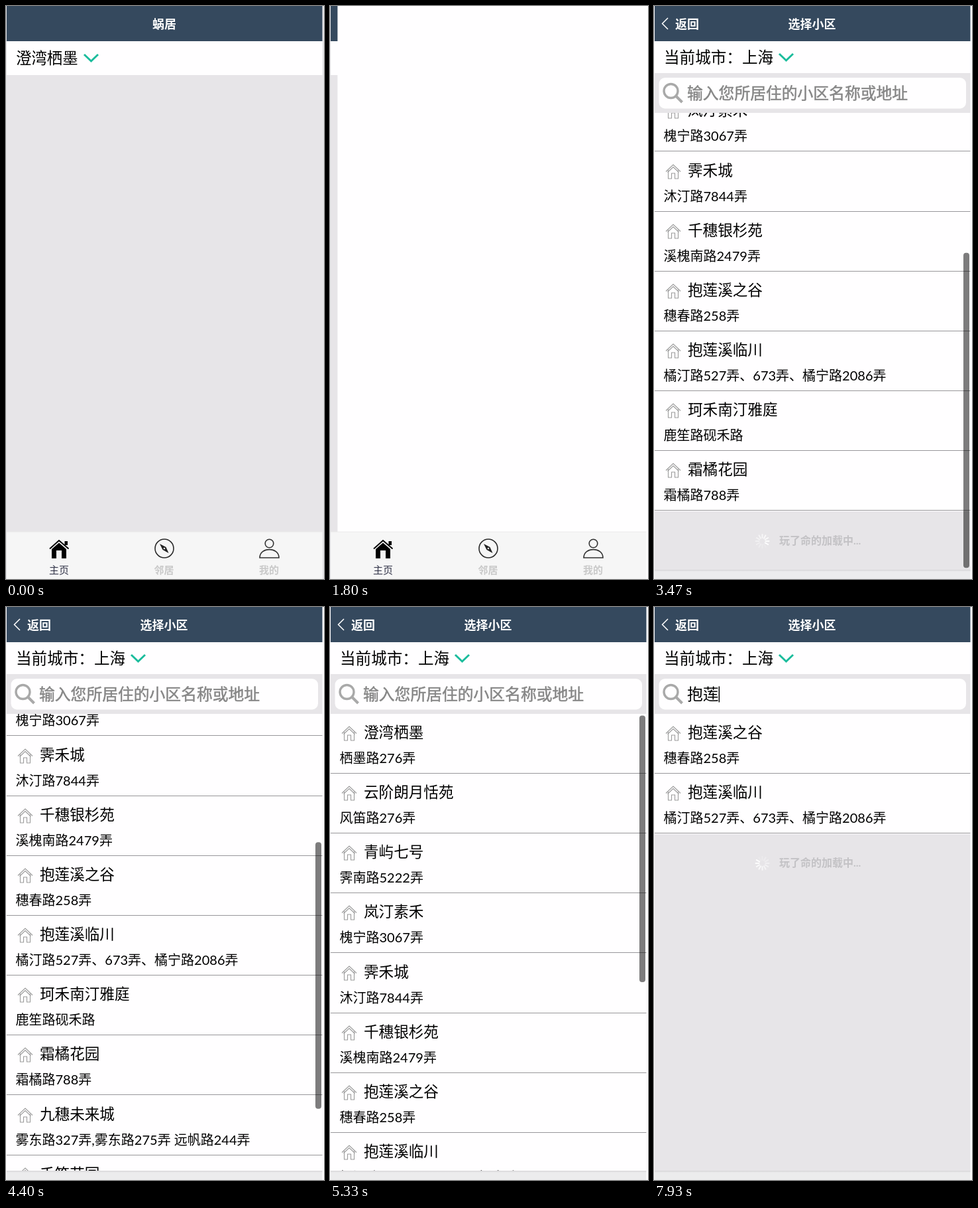
These frames come from a looping animation (480x863 px, 8000 ms). An HTML page:

```html
<!DOCTYPE html>
<html lang="zh-CN">
<head>
<meta charset="utf-8">
<title>选择小区</title>
<style>
  html, body { margin: 0; width: 100%; height: 100%; overflow: hidden; background: #fff; }
  svg { display: block; width: 480px; height: 863px; }
  text { font-family: Lato, "Noto Sans CJK SC", "Noto Sans CJK", sans-serif; white-space: pre; }
  .line { fill: none; stroke-linecap: butt; }
</style>
</head>
<body>
<svg id="stage" viewBox="0 0 480 863" xmlns="http://www.w3.org/2000/svg"></svg>
<script>
const LOOP = 8000;
const ROW = 90.15, TOP = 161, VIEW = 688.5;
const NAVY = '#35495e', GREY = '#e7e5e8', GREEN = '#1abc9c';

const places = [
  ['澄湾栖墨', '栖墨路276弄'],
  ['云阶朗月恬苑', '风笛路276弄'],
  ['青屿七号', '霁南路5222弄'],
  ['岚汀素禾', '槐宁路3067弄'],
  ['霁禾城', '沐汀路7844弄'],
  ['千穗银杉苑', '溪槐南路2479弄'],
  ['抱莲溪之谷', '穗春路258弄'],
  ['抱莲溪临川', '橘汀路527弄、673弄、橘宁路2086弄'],
  ['珂禾南汀雅庭', '鹿笙路砚禾路'],
  ['霜橘花园', '霜橘路788弄'],
  ['九穗未来城', '雾东路327弄,雾东路275弄 远帆路244弄'],
  ['禾笙花园', '砚禾路615弄']
];

// [time, scroll offset]
const scrollSteps = [
  [2870, 0], [3000, 26], [3330, 302], [4230, 302],
  [4400, 326], [4670, 483], [4730, 483], [5070, 0]
];

// [time, field text, candidates]
const typing = [
  [6270, 'b', '不吧被把北'],
  [6400, 'ba', '把吧八爸罢'],
  [6530, 'bao', '包报抱保宝'],
  [6670, "bao'l", ['抱莲', '暴力', '保留', '暴露', '包里']],
  [7070, '抱莲', null]
];

// Text placed by the vertical centre of its glyphs.
const text = (x, mid, size, str, fill = '#000', more = '') =>
  `<text x="${x}" y="${mid + size * 0.38}" font-size="${size}" fill="${fill}" ${more}>${str}</text>`;
const rect = (x, y, w, h, fill, more = '') =>
  `<rect x="${x}" y="${y}" width="${w}" height="${h}" fill="${fill}" ${more}/>`;
const line = (d, stroke, width, more = '') =>
  `<path class="line" d="${d}" stroke="${stroke}" stroke-width="${width}" ${more}/>`;
const bold = 'font-weight="700"';
const chevron = (x, y) => line(`M${x} ${y}l10.5 10 10.5 -10`, GREEN, 3);

const houseIcon = line(
  'M18 29.5L29 19 40 29.5M21.5 27.5V40H26.5V32H31.5V40H36.5V27.5M20.5 30.5L29 22.5 37.5 30.5', '#9b9b9b', 1.1);

const row = ([name, road], i) => `<g transform="translate(0 ${Math.round(i * ROW)})">
  ${rect(1, 0, 476.5, 91, '#fffeff')}${houseIcon}
  ${text(51, 27.5, 22.6, name)}${text(14.5, 66, 20, road)}
  ${rect(1, 89, 476.5, 1, '#98979a')}</g>`;

const petals = Array.from({ length: 12 }, (_, i) =>
  `<path d="M0 -5V-10" stroke="#fff" stroke-width="2" stroke-linecap="round" opacity="${0.15 + i * 0.075}" transform="rotate(${i * 30})"/>`).join('');
const loader = `<g id="loader"><g transform="translate(163.5 47)"><g id="spin">${petals}</g></g>
  ${text(189, 46, 16, '玩了命的加载中...', '#c3c2c5', bold)}</g>`;

const home = `
  ${rect(1, 0, 476.5, 53, NAVY)}
  ${text(239, 27, 18, '蜗居', '#fff', bold + ' text-anchor="middle"')}
  ${rect(1, 53, 476.5, 51, '#fffeff')}
  ${text(15, 78, 23.4, '澄湾栖墨')}${chevron(118, 73)}
  ${rect(1, 104, 476.5, 688, GREY)}`;

const tabs = `
  ${rect(1, 792, 476.5, 71, '#f6f6f6')}${rect(1, 791.5, 476.5, 1, '#ebebeb')}
  <path d="M69 818L80 808.5 91 818V832H84V820H76V832H69Z"/>
  ${line('M66 817.5L80 805 94.5 817.5', '#000', 2)}
  ${rect(88.5, 806, 4.5, 6, '#000')}
  <circle class="line" cx="239" cy="817" r="14" stroke="#2b2b2b" stroke-width="1.6"/>
  <path d="M232 810L241.5 815 245.5 824 236.5 819Z" fill="#222"/>
  <circle cx="239" cy="817" r="1.3" fill="#f6f6f6"/>
  <circle class="line" cx="397.5" cy="809.5" r="6.3" stroke="#333" stroke-width="1.6"/>
  ${line('M383 831C383 814.5 412 814.5 412 831Z', '#333', 1.6)}
  ${text(65, 849.5, 15, '主页', '#34364a', 'font-weight="500"')}
  ${text(223.5, 849.5, 15, '邻居', '#c9c9c9', bold)}
  ${text(382, 849.5, 15, '我的', '#c9c9c9', bold)}`;

const picker = `
  ${rect(1, 0, 476.5, 863, '#ececed')}
  ${rect(1, TOP, 476.5, VIEW, GREY)}
  <g clip-path="url(#view)"><g id="list">
    <g id="rows">${places.map(row).join('')}</g>
    <g id="hits">${places.slice(6, 8).map(row).join('')}</g>
    ${loader}</g>
  </g>
  ${rect(1, 849, 476.5, 3, 'url(#edge)')}
  <rect id="thumb" x="467" width="9" rx="4" fill="#000" fill-opacity=".51"/>
  ${rect(1, 0, 476.5, 53, NAVY)}
  ${line('M21 18L12.5 26.5 21 35', '#fff', 1.5)}
  ${text(32, 27, 18, '返回', '#fff', bold)}
  ${text(202.5, 27, 18, '选择小区', '#fff', bold)}
  ${rect(1, 53, 476.5, 48, '#fffeff')}
  ${text(15, 77, 23.6, '当前城市：上海')}${chevron(189, 72)}
  ${rect(1, 101, 476.5, 60, GREY)}
  ${rect(7.5, 108, 463.5, 46.5, '#fffeff', 'rx="9"')}
  <circle class="line" cx="25.5" cy="128" r="10.5" stroke="#a9a9a9" stroke-width="3.4"/>
  ${line('M33 135.5L42.5 145', '#a9a9a9', 4)}
  <g id="hint">${text(50, 131, 23.8, '输入您所居住的小区名称或地址', '#868686', 'stroke="#868686" stroke-width=".5"')}</g>
  <text id="field" x="50" y="139.5"></text>
  <rect id="under" x="50" y="141.5" height="1.6"/>
  <rect id="caret" y="119.5" width="1.5" height="24"/>
  <g id="popup"></g>`;

const stage = document.getElementById('stage');
stage.innerHTML = `<defs>
    <clipPath id="view"><rect x="0" y="${TOP}" width="480" height="${VIEW}"/></clipPath>
    <linearGradient id="bar" x2="0" y2="1"><stop stop-color="#f3f3f3"/><stop offset="1" stop-color="#cfcfcf"/></linearGradient>
    <linearGradient id="edge" x2="0" y2="1"><stop stop-color="#d6d5d7"/><stop offset="1" stop-color="#ececed"/></linearGradient>
    <filter id="shade" x="-5%" y="-30%" width="110%" height="170%"><feDropShadow dx="0" dy="2" stdDeviation="2.5" flood-opacity=".4"/></filter>
  </defs>
  ${rect(0, 0, 480, 863, '#e6e6e8')}
  <g id="home">${home}</g>
  <rect id="cover" y="0" width="480" height="863" fill="#fffeff"/>
  <g id="tabs">${tabs}</g>
  <g id="picker">${picker}</g>`;

const el = {};
stage.querySelectorAll('[id]').forEach(node => el[node.id] = node);
const show = (node, on) => node.style.display = on ? '' : 'none';

function popupMarkup(words) {
  const step = words[0].length > 1 ? 70.8 : 51;
  const width = step * 5 + 53, right = 36 + width;
  const items = [...words].map((word, i) =>
    text(51 + i * step, 175.5, 20, `${i + 1}.${word}`, i ? '#696969' : '#35b3c5')).join('');
  return rect(36, 152, width, 44.5, 'url(#bar)', 'rx="5" stroke="#bbb" stroke-width=".6" filter="url(#shade)"') + items +
    `<path d="M${right - 28} 174v10l-9 -5z" fill="#a2a2a2"/>
     <path d="M${right - 20.5} 174v10l9 -5z" fill="#2fa9cb"/>`;
}

function scrollAt(t) {
  const i = scrollSteps.findIndex(s => s[0] > t);
  if (i === 0) return 0;
  if (i < 0) return scrollSteps[scrollSteps.length - 1][1];
  const [t0, a] = scrollSteps[i - 1], [t1, b] = scrollSteps[i];
  const left = 1 - (t - t0) / (t1 - t0);
  return Math.round(b + (a - b) * left * left);
}

// cubic-bezier(.25, .1, .25, 1), solved by bisection
function ease(x) {
  const bez = (p, q, s) => 3 * p * s * (1 - s) ** 2 + 3 * q * s * s * (1 - s) + s ** 3;
  let lo = 0, hi = 1;
  for (let i = 0; i < 20; i++) {
    const mid = (lo + hi) / 2;
    if (bez(0.25, 0.25, mid) < x) lo = mid; else hi = mid;
  }
  return bez(0.1, 1, lo);
}

let lastStep;
function drawTyping(t) {
  const step = typing.filter(s => s[0] <= t).pop() || null;
  const composing = Boolean(step && step[2]);
  if (step !== lastStep) {
    lastStep = step;
    el.field.textContent = step ? step[1] : '';
    el.popup.innerHTML = composing ? popupMarkup(step[2]) : '';
    el.field.setAttribute('font-size', composing ? 26 : 23.8);
    el.field.setAttribute('letter-spacing', composing ? 0.6 : 0);
  }
  const width = step ? el.field.getComputedTextLength() : 0;
  el.under.setAttribute('width', composing ? width : 0);
  el.caret.setAttribute('x', 50 + width);
  show(el.hint, !step);
  show(el.caret, t >= 5870);
}

function draw(t) {
  const picking = t >= 1870;
  show(el.picker, picking);
  show(el.tabs, !picking);
  const slide = ease(Math.min(1, Math.max(0, (t - 1480) / 400)));
  el.cover.setAttribute('x', 480 * (1 - slide));
  if (!picking) return;

  const found = t >= 7270;
  const count = t < 2130 ? 0 : found ? 2 : t < 3670 ? 10 : 12;
  const offset = scrollAt(t);
  const height = (count + 1) * ROW;
  show(el.rows, count && !found);
  show(el.hits, found);
  [...el.rows.children].forEach((node, i) => show(node, i < count));
  el.list.setAttribute('transform', `translate(0 ${TOP - offset})`);
  el.loader.setAttribute('transform', `translate(0 ${Math.round(count * ROW) - 2})`);
  el.spin.setAttribute('transform', `rotate(${Math.floor(t / 83) * 30})`);

  const ratio = (VIEW - 5) / height;
  show(el.thumb, height > VIEW);
  el.thumb.setAttribute('y', TOP + 2.5 + offset * ratio);
  el.thumb.setAttribute('height', VIEW * ratio);
  drawTyping(t);
}

const start = performance.now();
function tick() {
  draw((performance.now() - start) % LOOP);
  requestAnimationFrame(tick);
}
tick();
</script>
</body>
</html>
```
